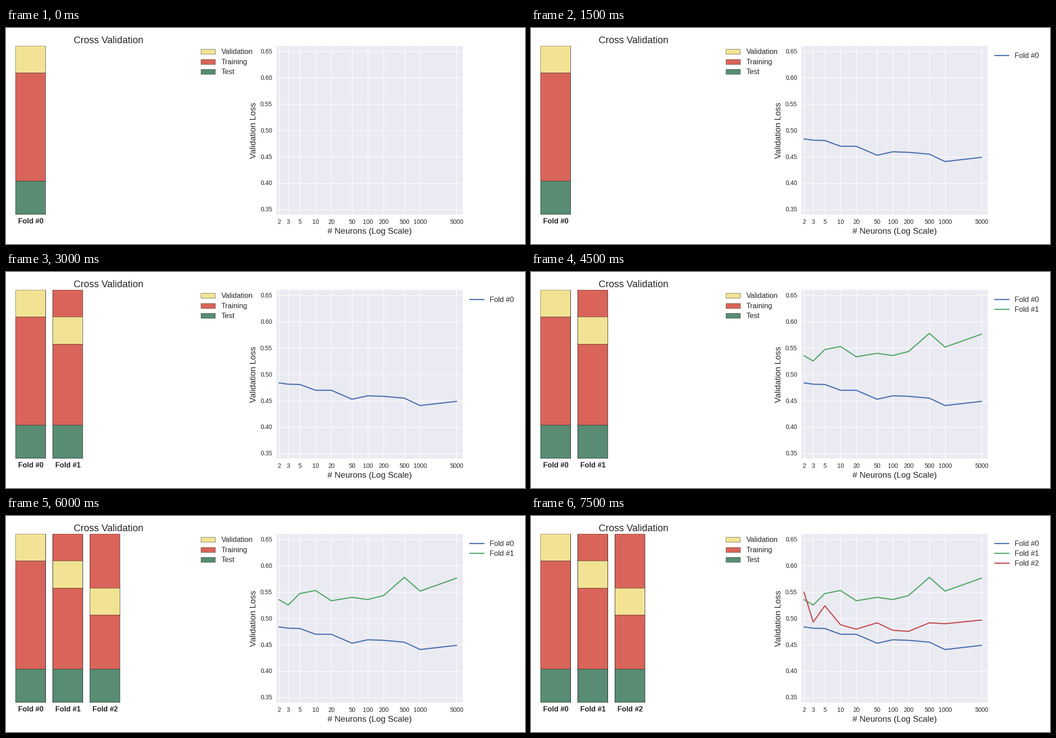
Write a matplotlib script that moves like this. It is 1159 by 483 pixels and loops after 8000 ms.

```python
import numpy as np
import matplotlib.pyplot as plt
from matplotlib.animation import FuncAnimation
from matplotlib.patches import Rectangle

W, H, DPI = 1159, 483, 96
PX = 72 / DPI  # points per pixel
INK = "#262626"
YELLOW, RED, GREEN = "#F2E394", "#D96459", "#588C73"
LINE_COLORS = ["#4C72B0", "#55A868", "#C44E52"]
TITLE, LABEL, LEGEND, TICK = 21.6, 18.9, 16.2, 13.5  # font sizes in pixels

NEURONS = np.array([2, 3, 5, 10, 20, 50, 100, 200, 500, 1000, 5000])
LOSSES = [
    [.484, .4815, .481, .470, .470, .453, .4595, .4585, .455, .441, .449],
    [.5357, .5255, .5472, .5531, .5336, .5401, .5359, .5435, .578, .5519, .5766],
    [.550, .493, .524, .488, .4797, .4917, .4775, .4755, .4917, .490, .497],
]

# One-pixel strokes snap to the pixel that starts at a whole coordinate.
TOP, BOTTOM, TEST_TOP = 40, 417, 342
BAR_X, BAR_STEP, BAR_W = 21, 83, 67
SPLITS = [TOP, 100, 161, 221]
PANE_LEFT, PANE_RIGHT = 604, 1020

plt.rcParams["font.family"] = "Liberation Sans"
fig = plt.figure(figsize=(W / DPI, H / DPI), dpi=DPI, facecolor="white")
ax = fig.add_axes([0, 0, 1, 1])
ax.set(xlim=(0, W), ylim=(H, 0))
ax.axis("off")


def to_x(neurons):
    return 609.6 + 116.75 * np.log10(np.asarray(neurons) / 2)


def to_y(loss):
    return 52.4 + 1178 * (0.65 - np.asarray(loss))


def text(x, y, s, size, ha="left", **kw):
    return ax.text(x, y, s, fontsize=size * PX, ha=ha, va="baseline",
                   color=INK, **kw)


def line(xs, ys, color, width, cap="butt", **kw):
    return ax.plot(xs, ys, color=color, lw=width * PX,
                   solid_capstyle=cap, **kw)[0]


def box(x0, y0, x1, y1, color, **kw):
    return ax.add_patch(Rectangle((x0, y0), x1 - x0, y1 - y0, fc=color, **kw))


def draw_static():
    text(228.7, 34, "Cross Validation", TITLE, "center")
    entries = [("Validation", YELLOW), ("Training", RED), ("Test", GREEN)]
    for (name, color), y in zip(entries, (47, 70, 92)):
        box(435, y, 467, y + 11, color, ec=(0, 0, 0, 0.5), lw=PX)
        text(481, y + 11, name, LEGEND)

    box(PANE_LEFT, TOP, PANE_RIGHT, BOTTOM, "#EAEAF2", lw=0)
    for n in NEURONS:
        line([to_x(n)] * 2, [TOP, BOTTOM], "white", 1.3)
        text(to_x(n), 438, str(n), TICK, "center")
    for loss in np.arange(0.35, 0.66, 0.05):
        line([PANE_LEFT, PANE_RIGHT], [to_y(loss)] * 2, "white", 1.3)
        text(594.5, to_y(loss) + 4.5, f"{loss:.2f}", TICK, "right")
    text(812.5, 460, "# Neurons (Log Scale)", LABEL, "center")
    text(558, 229, "Validation Loss", LABEL, "center", rotation=90,
         rotation_mode="anchor")


def make_bar(k):
    """Return the bar's artists and its two side edges."""
    x0 = BAR_X + k * BAR_STEP
    x1 = x0 + BAR_W
    parts = [
        box(x0, TOP, x1, TEST_TOP, RED, lw=0),
        box(x0, SPLITS[k], x1, SPLITS[k + 1], YELLOW, lw=0),
        box(x0, TEST_TOP, x1, BOTTOM, GREEN, lw=0),
        text(x0 + 34, 437, f"Fold #{k}", LEGEND, "center", weight="bold"),
    ]
    for y in {TOP, SPLITS[k], SPLITS[k + 1], TEST_TOP, BOTTOM - 1}:
        parts.append(line([x0, x1], [y, y], "black", 1,
                          alpha=0.35 if y == TOP else 0.55))
    sides = [line([x, x], [TOP, BOTTOM], "black", 1) for x in (x0, x1)]
    return parts + sides, sides


def make_curve(k):
    y = 61 + 22.2 * k
    return [
        line(to_x(NEURONS), to_y(LOSSES[k]), LINE_COLORS[k], 2.6, "round",
             solid_joinstyle="round"),
        line([1035, 1067], [y, y], LINE_COLORS[k], 2.6, "round"),
        text(1079.5, y + 5.8, f"Fold #{k}", LEGEND),
    ]


draw_static()
bars = [make_bar(k) for k in range(3)]
curves = [make_curve(k) for k in range(3)]


def update(i):
    step = i // 3  # a new bar and a new curve appear alternately
    for k, (parts, sides) in enumerate(bars):
        age = step - 2 * k
        for part in parts:
            part.set_visible(age >= 0)
        for side in sides:
            side.set_alpha(1 - 0.6 ** (max(age, 0) + 2))
    bars[0][1][0].set_alpha(0.4)  # half hidden at the panel's border
    for k, parts in enumerate(curves):
        for part in parts:
            part.set_visible(step > 2 * k)
    return []


anim = FuncAnimation(fig, update, frames=16, interval=500, repeat=True,
                     repeat_delay=0, init_func=lambda: update(0))
plt.show()
```
